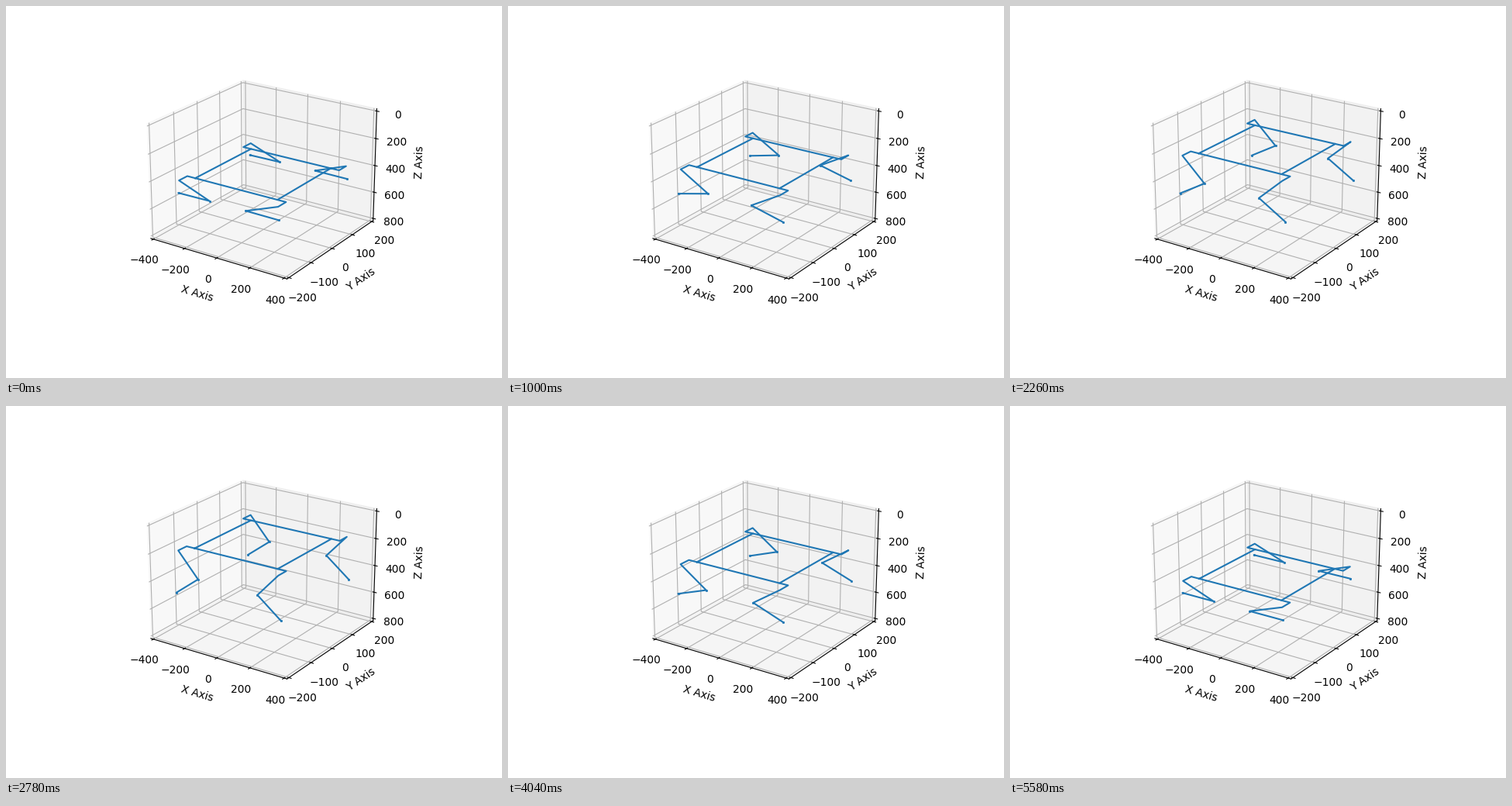
Animation of 640 by 480 pixels, one loop 5.68 s. Source, as a matplotlib script:

```python
import itertools

import matplotlib.pyplot as plt
import numpy as np
from matplotlib.animation import FuncAnimation

TICK = 20            # ms per drawn frame
LOOP = 5680          # ms per loop
POSES = 120          # poses in one crouch-and-rise cycle
HALF = POSES // 2

BODY_X, BODY_Y = 250, 125     # half size of the body frame
HIP_X, HIP_Y = 300, 160       # hip joint position
THIGH, SHIN = 210, 195


def limits(a, b):
    """Axis limits with a thin margin on both sides."""
    m = (b - a) / 48
    return a - m, b + m


def pose_at(ms):
    """Poses advance unevenly: held for 20, 100 and 20 ms in turn."""
    group, rest = divmod(ms, 140)
    step = 0 if rest < 20 else 1 if rest < 120 else 2
    return min(3 * group + step, POSES - 1)


def body_points(z):
    x = BODY_X * np.array([-1, 1, 1, -1, -1])
    y = BODY_Y * np.array([-1, -1, 1, 1, -1])
    return x, y, np.full(5, z)


def leg_points(sx, sy, z, thigh, shin):
    """Body corner, hip link, hip joint, knee, foot."""
    knee_x = HIP_X - THIGH * np.cos(thigh)
    foot_x = knee_x + SHIN * np.cos(shin)
    knee_z = z + THIGH * np.sin(thigh)
    foot_z = knee_z + SHIN * np.sin(shin)
    x = sx * np.array([BODY_X, HIP_X, HIP_X, knee_x, foot_x])
    y = sy * np.array([BODY_Y, BODY_Y, HIP_Y, HIP_Y, HIP_Y])
    return x, y, np.array([z, z, z, knee_z, foot_z])


fig = plt.figure(figsize=(6.4, 4.8), dpi=100)
fig.subplots_adjust(bottom=0.2)
ax = fig.add_subplot(projection="3d")
ax.view_init(elev=22, azim=-56)
ax.set_xlim(*limits(-400, 400))
ax.set_ylim(*limits(-200, 200))
ax.set_zlim(*limits(800, 0))
ax.set_xticks(range(-400, 401, 200))
ax.set_yticks(range(-200, 201, 100))
ax.set_zticks(range(0, 801, 200))
ax.set_xlabel("X Axis")
ax.set_ylabel("Y Axis")
ax.set_zlabel("Z Axis")

SIDES = list(itertools.product((-1, 1), repeat=2))
body, = ax.plot(*body_points(400), color="C0", lw=1.5)
legs = [
    ax.plot(*leg_points(sx, sy, 400, 0, 0), color="C0", lw=1.5,
            marker="o", ms=1.7, mew=0.5, markevery=[3, 4])[0]
    for sx, sy in SIDES
]


def update(n):
    k = pose_at(n * TICK) + 1
    rise = min(k, POSES - k) / HALF
    z = 400 - 220 * rise
    thigh = np.radians(25 + 30 * rise)
    shin = np.radians(45 * rise)
    body.set_data_3d(*body_points(z))
    for leg, (sx, sy) in zip(legs, SIDES):
        leg.set_data_3d(*leg_points(sx, sy, z, thigh, shin))
    return [body, *legs]


anim = FuncAnimation(fig, update, frames=LOOP // TICK, interval=TICK,
                     repeat=True, repeat_delay=0, blit=False)
plt.show()
```
